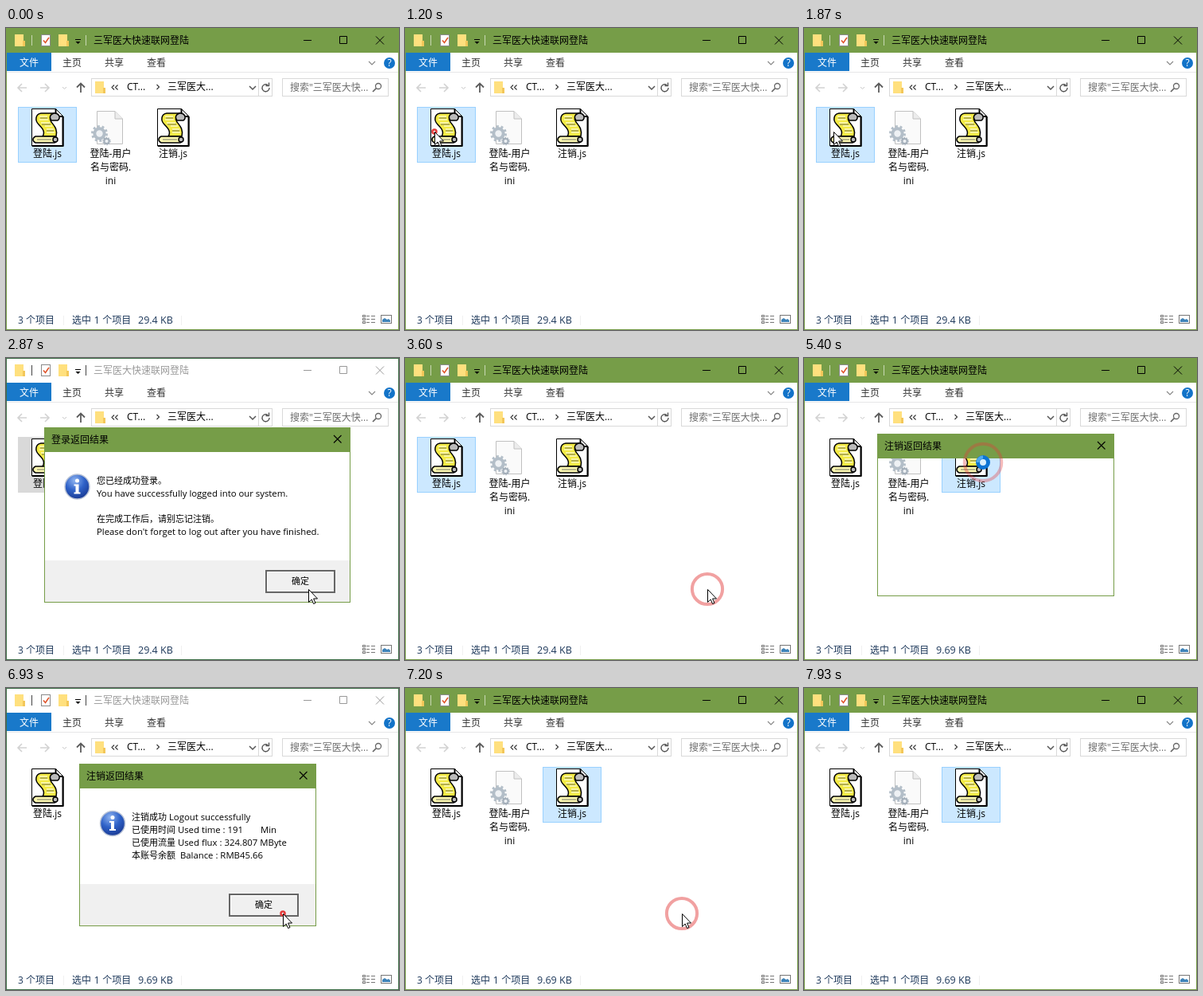
Write an HTML page that moves like this. It is 494 px wide and 379 px high and loops after 7.99 s.

```html
<!DOCTYPE html>
<html lang="zh-CN">
<head>
<meta charset="utf-8">
<style>
html, body { margin: 0; width: 100%; height: 100%; overflow: hidden; background: #fff; }
svg { display: block; }
text { font-family: "Noto Sans CJK SC", "Noto Sans CJK", sans-serif; white-space: pre; }
tspan { font-family: "Open Sans", sans-serif; }
.mid { text-anchor: middle; }
.line { fill: none; stroke: #000; }
.bar { fill: #769d48; }
.edge { fill: none; stroke: #769d48; }
.sep { stroke: #c9d8b4; }
.off > .bar { fill: #fff; }
.off > .edge { stroke: #3f7048; }
.off > .sep { stroke: #444; }
.off > .caption { fill: #999; }
.off > .buttons { stroke: #999; }
</style>
</head>
<body>
<script>
const FRAME = 200 / 3, LOOP = 7990;

// Latin runs get their own font and size inside a CJK line.
function text(x, y, str, { size = 12, latin = 12, fill = '#000', cls = '' } = {}) {
  const runs = str.replace(/[ -~]+/g, s => `<tspan font-size="${latin}">${s}</tspan>`);
  return `<text x="${x}" y="${y}" font-size="${size}" fill="${fill}" class="${cls}">${runs}</text>`;
}
const rect = (x, y, w, h, fill, extra = '') =>
  `<rect x="${x}" y="${y}" width="${w}" height="${h}" fill="${fill}" ${extra}/>`;
const line = (d, color = '#000', width = 1) =>
  `<path d="${d}" fill="none" stroke="${color}" stroke-width="${width}"/>`;
const at = (x, y, body, attrs = '') => `<g transform="translate(${x} ${y})" ${attrs}>${body}</g>`;

const folder = (x, y) => at(x, y,
  `<path d="M0 0H11V8H13V15H0Z" fill="#ffe07e"/><path d="M10 8H13V15H10Z" fill="#f3c75a"/>`);

const scriptIcon = (x, y) => at(x, y,
  `<path d="M.5 .5H30.5L40 10V47H.5Z" fill="#fff" stroke="#000"/>
   <path d="M30.5 .5V10H40M39.5 10V47H1" class="line" stroke-width="2"/>
   <g stroke="#000" stroke-width="1.5">
     <path d="M12 6H28C23 9 22 13 25 17C29 22 33 26 31 35H14C18 29 13 24 9 20C4 15 5 7 12 6Z" fill="#f3ea45"/>
     <path d="M28 6C35 5 37 12 33 15H25C22 11 23 8 28 6Z" fill="#bbb"/>
     <path d="M5 35H28C33 35 33 43 28 43H5C1 41 1 37 5 35Z" fill="#fbf7b0"/>
     <circle cx="30" cy="39" r="3" fill="#bbb"/>
   </g>` +
  line('M10 10H20M10 14H21M12 18H23M17 22H26M19 26H28M19 30H29', '#fff', 1.2) +
  line('M11 12H20M13 20H24M19 28H28M7 39H25', '#555', .8));

const gear = (x, y, r, color) =>
  `<circle cx="${x}" cy="${y}" r="${r * .9}" fill="none" stroke="${color}" stroke-width="${r * .3}"
    stroke-dasharray="${r * Math.PI * .09}"/>
   <circle cx="${x}" cy="${y}" r="${r * .62}" fill="#eef1f4" stroke="${color}" stroke-width="${r * .4}"/>`;

const iniIcon =
  `<path d="M114.5 104.5H137L146.5 114V145.5H114.5Z" fill="#fafafa" stroke="#c0c0c0"/>
   <path d="M137 104.5V114H146.5" fill="#ececec" stroke="#c0c0c0"/>` +
  gear(117.5, 132.5, 10, '#b3bec8') + gear(126.5, 142, 5, '#a4afba');

const cell = (id, x) => rect(x + .5, 99.5, 73, 69, 'none', `id="${id}"`);

const explorer = `<g id="win">
  ${rect(0, 0, 494, 379, '#fff')}
  <rect class="bar" width="494" height="31"/>
  ${folder(11, 8)}${folder(66, 8)}
  <path class="sep" d="M32.5 9V22M100.5 9V22"/>
  ${rect(44.5, 8.5, 11, 14, '#fff', 'stroke="#8a8a8a"')}
  ${line('M47 15.500L49.5 18.500L54 12', '#e0542b', 1.6)}
  <path d="M87 14.5H94" class="line"/><path d="M87.5 17H93.5L90.5 20Z"/>
  ${text(110, 20, '三军医大快速联网登陆', { cls: 'caption' })}
  <path class="line buttons" d="M374 15.5H384M419.5 10.5H428.5V19.5H419.5ZM465 10.500L475 20.500M475 10.500L465 20.500"/>
  ${rect(1, 31, 56, 23, '#1979ca')}${line('M1 55.500H493', '#e6e7e8')}
  ${text(17, 48, '文件', { fill: '#fff' })}
  ${['主页', '共享', '查看'].map((s, i) => text(71 + 53 * i, 48, s, { fill: '#333' })).join('')}
  ${line('M456 42L460 46L464 42', '#888', 1.2)}
  <circle cx="482" cy="44" r="7" fill="#1273c8"/>
  ${text(482, 48, '?', { fill: '#fff', cls: 'mid' })}
  ${line('M26 75H15.500M20 70L15 75L20 80M43 75H53.500M49 70L54 75L49 80', '#d2d2d2', 1.6)}
  ${line('M71 74L73.500 76.500L76 74', '#c8c8c8')}
  ${line('M94 81V70M89 74.500L94 69.500L99 74.500', '#5c5c5c', 1.8)}
  ${rect(107.5, 63.5, 227, 22, '#fff', 'stroke="#d9d9d9"')}${line('M317.500 64V86', '#d9d9d9')}
  ${folder(112, 67)}
  ${line('M136 71.500L133 74.500L136 77.500M140.500 71.500L137.500 74.500L140.500 77.500M189.500 71L192.500 74L189.500 77', '#333', 1.1)}
  ${text(152, 78, 'CT...')}${text(203, 78, '三军医大...')}
  ${line('M306 73L310 77L314 73', '#555', 1.5)}
  ${line('M329 71.500A4.500 4.500 0 1 0 331 75M326.500 72.500H330.500V68.500', '#555', 1.4)}
  ${rect(347.5, 63.5, 133, 22, '#fff', 'stroke="#d9d9d9"')}
  ${text(357, 79, '搜索"三军医大快...', { fill: '#6d6d6d' })}
  <circle cx="468" cy="73" r="3.500" fill="none" stroke="#666" stroke-width="1.300"/>
  ${line('M465.500 75.500L461 80', '#666', 1.700)}
  ${cell('loginCell', 15)}${cell('logoutCell', 173)}
  ${scriptIcon(32, 101)}${scriptIcon(190, 101)}${iniIcon}
  ${text(52, 162, '登陆.js', { cls: 'mid' })}
  ${['登陆-用户', '名与密码.', 'ini'].map((s, i) => text(131.5, 162 + 17 * i, s, { cls: 'mid' })).join('')}
  ${text(210, 162, '注销.js', { cls: 'mid' })}
  ${text(15, 371, '3 个项目', { fill: '#1e395b' })}${line('M72.500 361V373M220.500 361V373', '#f0f0f0')}
  ${text(83, 371, '选中 1 个项目', { fill: '#1e395b', latin: 13 })}
  <text id="size" x="166" y="371" fill="#1e395b"><tspan font-size="12.500"></tspan></text>
  ${[361, 365, 369].map(y => rect(448.5, y - .5, 3, 2, '#fff', 'stroke="#777"') +
    line(`M453 ${y + .5}H457M459 ${y + .5}H464`, '#777')).join('')}
  ${rect(471.5, 360.5, 13, 10, '#fff', 'stroke="#777"')}
  <path d="M473 369V366L476 364L479 366L481 365L483 367V369Z" fill="#3f83b8"/>
  <rect class="edge" x=".5" y=".5" width="493" height="378"/>
</g>`;

function infoIcon(x, y) {
  return `<circle cx="${x}" cy="${y}" r="15.500" fill="url(#ball)" stroke="#b9c3d6" stroke-width="1.500"/>` +
    at(x, y, `<circle cy="-7.500" r="2.500" fill="#fff"/>
      <path d="M-4 -3H2V7H4V9H-4V7H-2V-1H-4Z" fill="#fff"/>`);
}

function dialog(id, { x, y, w, h, title, icon, lines, button }) {
  const bx = x + w - button, by = y + h - 41;
  const small = { size: 11, latin: 11.35 };
  const body = rect(x, y + 30, w, h - 30, '#fff') + rect(x, y + h - 53, w, 53, '#f0f0f0') +
    infoIcon(...icon) +
    lines.map(([lx, ly, s]) => text(lx, ly, s, small)).join('') +
    rect(bx + 1, by + 1, 86, 27, '#f0f0f0', 'stroke="#666" stroke-width="2"') +
    line(`M${bx + 2.5} ${by + 26}V${by + 2.5}H${bx + 85}`, '#fff') +
    text(bx + 44, by + 18, '确定', { ...small, cls: 'mid' });
  return `<g id="${id}"><g>${body}</g>
    <rect class="bar" x="${x}" y="${y}" width="${w}" height="31"/>
    ${text(x + 9, y + 20, title)}
    ${line(`M${x + w - 21} ${y + 10}l9.500 9.500m0 -9.500l-9.500 9.500`, '#000', 1.1)}
    <rect class="edge" x="${x + .5}" y="${y + .5}" width="${w - 1}" height="${h - 1}"/></g>`;
}

const dialogs = dialog('login', {
  x: 48, y: 87, w: 385, h: 220, title: '登录返回结果', icon: [89.5, 161.5], button: 107,
  lines: [
    [114, 158, '您已经成功登录。'],
    [114, 174, 'You have successfully logged into our system.'],
    [114, 206, '在完成工作后，请别忘记注销。'],
    [114, 222, "Please don't forget to log out after you have finished."]]
}) + dialog('logout', {
  x: 92, y: 95, w: 298, h: 204, title: '注销返回结果', icon: [134, 170], button: 110,
  lines: [
    [158, 166, '注销成功 Logout successfully'],
    [158, 182, '已使用时间 Used time : 191'], [320, 182, 'Min'],
    [158, 198, '已使用流量 Used flux : 324.807 MByte'],
    [158, 214, '本账号余额  Balance : RMB45.66']]
});

document.body.innerHTML = `<svg width="494" height="379" viewBox="0 0 494 379">
  <defs><radialGradient id="ball" cx=".4" cy=".25" r=".8">
    <stop offset="0" stop-color="#8fb4f0"/><stop offset=".5" stop-color="#2f62c8"/><stop offset="1" stop-color="#17368f"/>
  </radialGradient></defs>
  ${explorer}${dialogs}<g id="rings"></g>
  <path id="arrow" d="M.5 .500V16.500L4.200 13L6.600 18.500L9 17.500L6.600 12H11.500Z" fill="#fff" stroke="#000"/>
  <g id="busy"><circle r="6.500" fill="#d8eefc" stroke="#0c74d4" stroke-width="5"/>
    <path d="M-6.500 0A6.500 6.500 0 0 1 0 -6.500" fill="none" stroke="#4fa9ee" stroke-width="4"/></g>
</svg>`;

const $ = id => document.getElementById(id);
const show = (el, on) => el.setAttribute('visibility', on ? 'inherit' : 'hidden');

// Pointer path: [tick, x, y]
const path = [
  [12, 19, 134], [15, 37, 130], [37, 37, 130], [43, 380, 290], [59, 380, 290],
  [66, 225, 131], [91, 225, 131], [97, 348, 283], [115, 348, 283], [118, 37, 259]];
const clicks = [18, 21, 50, 72, 76, 104];
const opened = { login: [29, 52], logout: [81, 106] };

function pointer(n) {
  const i = path.findIndex(p => p[0] >= n);
  if (i < 1) return path[i ? path.length - 1 : 0].slice(1);
  const [a, ax, ay] = path[i - 1], [b, bx, by] = path[i];
  const u = (n - a) / (b - a), e = u * u * (3 - 2 * u);
  return [ax + (bx - ax) * e, ay + (by - ay) * e];
}

function paint(el, fill, stroke) {
  el.setAttribute('fill', fill);
  el.setAttribute('stroke', stroke);
}

function draw(n) {
  const [x, y] = pointer(n);
  let modal = false, loading = false;
  for (const [id, [from, to]] of Object.entries(opened)) {
    const on = n >= from && n < to;
    show($(id), on);
    show($(id).firstElementChild, on && n > from);
    modal ||= on && n > from;
    loading ||= n === from;
  }
  $('win').setAttribute('class', modal ? 'off' : '');

  const second = n >= 73;
  const selected = second ? $('logoutCell') : $('loginCell');
  const over = !modal && x >= 173 && x < 247 && y >= 99 && y < 169;
  paint($('loginCell'), 'none', 'none');
  paint($('logoutCell'), over ? '#e5f3ff' : 'none', over ? '#e5f3ff' : 'none');
  if (modal && n >= 38) paint(selected, '#d9d9d9', '#d9d9d9');
  else paint(selected, '#cce8ff', '#99d1ff');
  $('size').firstElementChild.textContent = second ? '9.69 KB' : '29.4 KB';

  $('rings').innerHTML = clicks.map(c => {
    const age = n - c;
    if (age < 0 || age > 6) return '';
    const [cx, cy] = pointer(c);
    return `<circle cx="${cx}" cy="${cy}" r="${2.5 + 4.15 * age}" fill="none" stroke="#e23b3b"
      stroke-width="${Math.min(4, 2.5 + age * .5)}" opacity="${1 - age * .13}"/>`;
  }).join('');

  const visible = n >= 12 && n < 119;
  show($('arrow'), visible && !loading);
  show($('busy'), visible && loading);
  $('arrow').setAttribute('transform', `translate(${Math.round(x)} ${Math.round(y)})`);
  $('busy').setAttribute('transform', `translate(${x} ${y})`);
}

function tick() {
  draw(Math.floor((performance.now() % LOOP + 5) / FRAME) % 120);
  requestAnimationFrame(tick);
}
tick();
</script>
</body>
</html>
```
